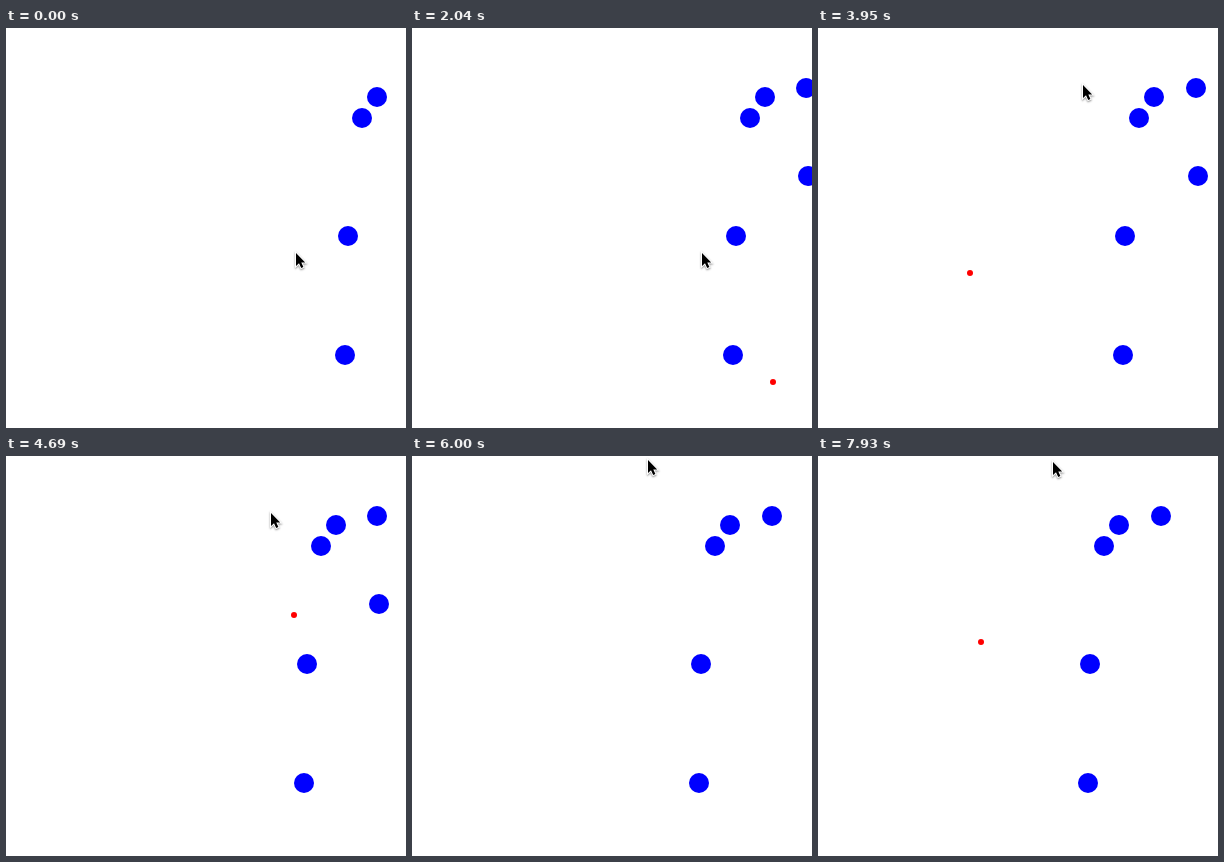
Animation, 400 px wide and 400 px high, one loop 8 s. Source, as an HTML page with a canvas:

```html
<!DOCTYPE html>
<html lang="en">
<head>
<meta charset="utf-8">
<title>Cannon</title>
<style>
html, body { margin: 0; width: 100%; height: 100%; overflow: hidden; background: #fff; }
canvas { display: block; width: 400px; height: 400px; }
</style>
</head>
<body>
<canvas id="stage"></canvas>
<script>
const LOOP = 8000, TICK = 56.85, GRAVITY = 0.35;
const HOLDS = 8; // picture updates per section
const sections = [150, 1310, 2480, 3650, 4830, 6000, 7190, 8380];

// Targets drift left by half a pixel per tick.
const targets = [
  { x: 371, y: 69 },
  { x: 356, y: 90 },
  { x: 342, y: 208 },
  { x: 339.5, y: 327 },
  { x: 412.5, y: 60, from: 16 },
  { x: 414.5, y: 148, from: 20, until: 90 }
];
const shots = [
  { tick: 5, vx: 11.44, vy: 7.2 },
  { tick: 55, vx: 10.44, vy: 13.93 },
  { tick: 122, vx: 9.24, vy: 15.96 }
];
// Pointer positions: tick, x, y
const pointerPath = [
  [38, 290, 225], [43, 265, 57],
  [100, 265, 57], [105, 236, 4],
  [117, 236, 4], [120, 235, 6]
];

const canvas = document.getElementById('stage');
const ctx = canvas.getContext('2d');
const scale = window.devicePixelRatio || 1;
canvas.width = canvas.height = 400 * scale;
ctx.scale(scale, scale);

function tickAt(time) {
  if (time < sections[0]) return 0;
  const k = sections.findIndex(end => time < end) - 1;
  const step = (sections[k + 1] - sections[k]) / HOLDS;
  const held = sections[k] + step * Math.floor((time - sections[k]) / step + 0.15);
  return Math.floor(held / TICK + 0.28);
}

function dot(x, y, radius, color) {
  ctx.fillStyle = color;
  ctx.beginPath();
  ctx.arc(x, y, radius, 0, 2 * Math.PI);
  ctx.fill();
}

function pointerAt(tick) {
  const next = pointerPath.findIndex(p => tick < p[0]);
  if (next === 0) return pointerPath[0].slice(1);
  if (next < 0) return pointerPath[pointerPath.length - 1].slice(1);
  const [t0, x0, y0] = pointerPath[next - 1], [t1, x1, y1] = pointerPath[next];
  const f = (tick - t0) / (t1 - t0);
  return [Math.round(x0 + (x1 - x0) * f), Math.round(y0 + (y1 - y0) * f)];
}

const arrow = new Path2D('M0 0V13L3 10.2L5.2 15L7.4 14L5.3 9.4H9.2Z');

function drawPointer([x, y]) {
  ctx.save();
  ctx.translate(x, y);
  ctx.lineWidth = 2;
  ctx.strokeStyle = '#fff';
  ctx.shadowColor = 'rgba(0,0,0,.45)';
  ctx.shadowBlur = 2 * scale;
  ctx.shadowOffsetY = scale;
  ctx.stroke(arrow);
  ctx.shadowColor = 'transparent';
  ctx.fillStyle = '#000';
  ctx.fill(arrow);
  ctx.restore();
}

function draw(tick) {
  ctx.fillStyle = '#fff';
  ctx.fillRect(0, 0, 400, 400);
  for (const { x, y, from = 0, until = Infinity } of targets) {
    if (tick >= from && tick < until) dot(Math.floor(x - tick / 2), y, 10, '#00f');
  }
  for (const { tick: fired, vx, vy } of shots) {
    const n = tick - fired;
    const x = 6 + vx * n;
    const y = 403.3 - vy * n + GRAVITY * n * (n + 1) / 2;
    if (n > 0 && x < 405) dot(Math.round(x), Math.round(y), 3, '#f00');
  }
  drawPointer(pointerAt(tick));
}

const start = performance.now();
function frame() {
  draw(tickAt((performance.now() - start) % LOOP));
  requestAnimationFrame(frame);
}
frame();
</script>
</body>
</html>
```
